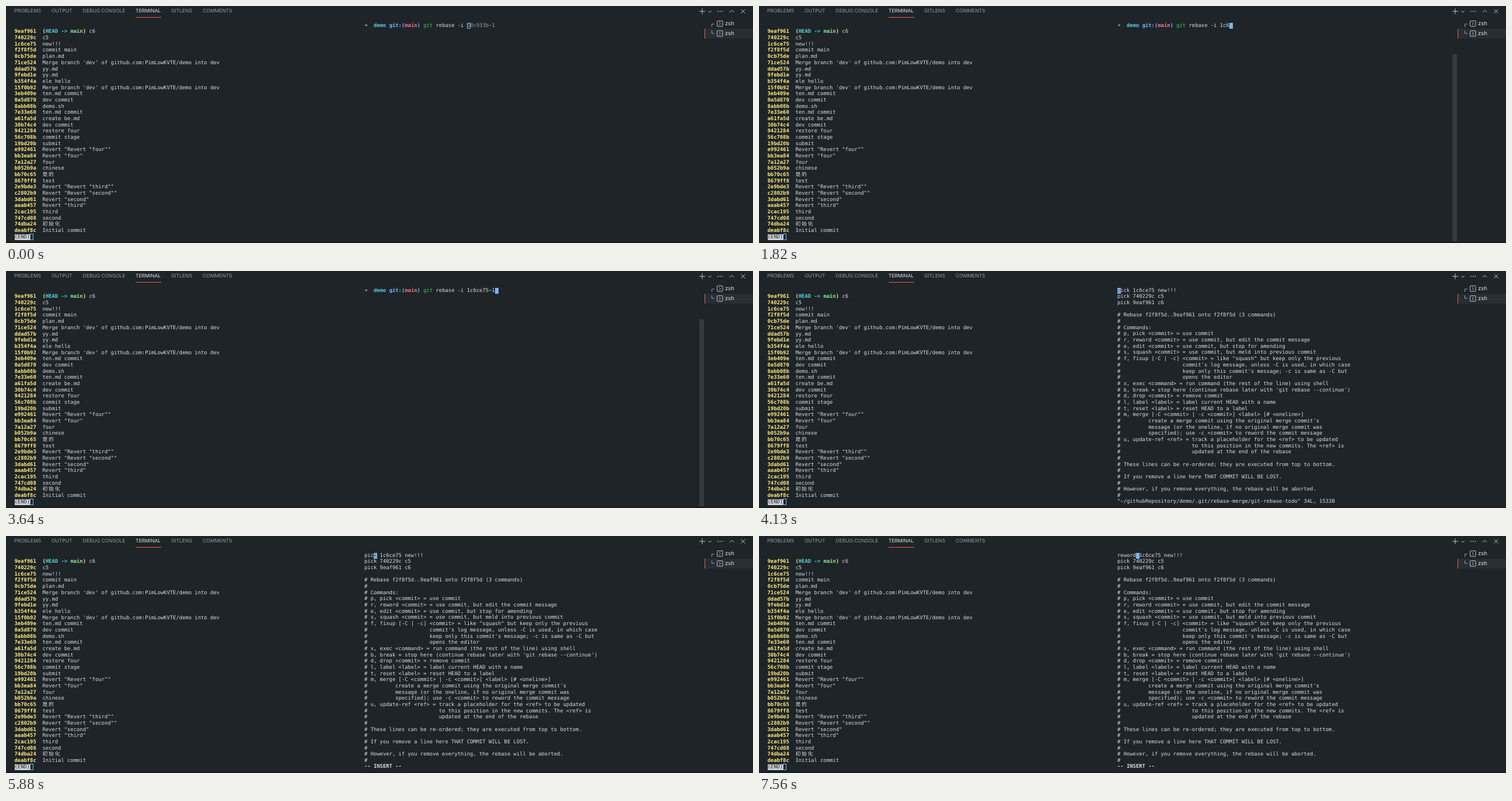
These frames come from a looping animation (1280x407 px, 8000 ms). An HTML page:

```html
<!DOCTYPE html>
<html lang="en">
<head>
<meta charset="utf-8">
<title>Interactive rebase</title>
<style>
  :root { --bg: #1f2428; --fg: #d9dde1; --cw: 5.3333px; --rh: 10.6667px; --blue: #79b8ff; --accent: #e5604c; }
  html, body { margin: 0; width: 100%; height: 100%; overflow: hidden; background: var(--bg); }
  #stage { position: relative; width: 1280px; height: 407px; overflow: hidden; background: var(--bg);
    color: var(--fg); text-rendering: geometricPrecision; }
  #stage > * { position: absolute; }
  pre, .cursor { margin: 0; font: 8.859px/var(--rh) "DejaVu Sans Mono", "Noto Sans CJK SC", monospace; white-space: pre; }
  .pane { top: 28.8px; left: 614px; }
  #log { left: 14.5px; }
  #picks { top: calc(28.8px + var(--rh)); }
  #help { top: calc(28.8px + 4 * var(--rh)); }
  .status { top: calc(28.8px + 34 * var(--rh)); }
  b { font-weight: 700; }
  .yellow { color: #ffea7f; }
  .cyan { color: #56d4dd; }
  .green { color: #85e89d; }
  .blue { color: var(--blue); }
  .red { color: #f97583; }
  .cmd { color: #34d058; }
  .hint { color: #959da5; }
  .arrow { display: inline-block; width: var(--cw); }
  .cjk { letter-spacing: 1.8px; }
  .inverse { background: #d1d5da; color: var(--bg); }
  .cursor { position: absolute; box-sizing: border-box; width: 5.6px; height: var(--rh); background: var(--blue); color: #586069; }
  .hollow { background: none; border: 1px solid var(--blue); }
  .tab, .name { font-family: Inter, "Liberation Sans", sans-serif; white-space: pre; }
  .tab { top: 4px; font-size: 8.5px; line-height: 11px; color: #959da5; }
  .tab.on { color: #e1e4e8; }
  #underline { left: 222px; top: 18.6px; width: 44px; height: 1px; background: var(--accent); }
  #selected { left: 1197px; top: 39px; width: 83px; height: 17px; background: #292e34; }
  #selected::before { content: ""; position: absolute; left: 0; width: 1px; height: 17px; background: var(--accent); }
  .name { left: 1232px; font-size: 9.5px; line-height: 12px; color: #e1e4e8; }
  #bar { left: 1188px; top: 83px; width: 8px; height: 321px; background: #353a3f; opacity: 0; }
  #foot { left: 0; top: 405px; width: 1280px; height: 2px; background: #191d21; }
  svg { left: 0; top: 0; fill: none; stroke: #d1d5da; stroke-width: .9; }
</style>
</head>
<body>
<div id="stage">
  <span class="tab" style="left:14px">PROBLEMS</span>
  <span class="tab" style="left:78px">OUTPUT</span>
  <span class="tab" style="left:131.5px">DEBUG CONSOLE</span>
  <span class="tab on" style="left:222px">TERMINAL</span>
  <span class="tab" style="left:283px">GITLENS</span>
  <span class="tab" style="left:337px">COMMENTS</span>
  <div id="underline"></div>
  <div id="selected"></div>
  <span class="name" style="top:24.5px">zsh</span>
  <span class="name" style="top:41.5px">zsh</span>
  <svg width="1280" height="407">
    <path d="M1188 9.2h10M1193 4.2v10M1203.5 8.3l2.6 2.6 2.6-2.6M1239.7 11l3.8-3.8 3.8 3.8M1259.5 5.7l7 7m0-7l-7 7"/>
    <path d="M1219 9.3h1.5m2.4 0h1.5m2.4 0h1.5" stroke-width="1.5"/>
    <path d="M1209.5 36v-5h4.5M1209.5 42v5h4.5" stroke="#a5abb1"/>
    <g id="icon"><rect x="1218.5" y="25.5" width="9.5" height="9.5" rx="1"/><path d="M1221.8 27.8l2.5 2.5-2.5 2.5"/></g>
    <use href="#icon" y="17"/>
  </svg>
  <pre id="log" class="pane"></pre>
  <pre id="shell" class="pane"><span id="line"></span><span id="cursor" class="cursor"></span></pre>
  <pre id="picks" class="pane">pick 740229c c5
pick 9eaf961 c6</pre>
  <pre id="help" class="pane">Rebase f2f8f5d..9eaf961 onto f2f8f5d (3 commands)

Commands:
p, pick &lt;commit&gt; = use commit
r, reword &lt;commit&gt; = use commit, but edit the commit message
e, edit &lt;commit&gt; = use commit, but stop for amending
s, squash &lt;commit&gt; = use commit, but meld into previous commit
f, fixup [-C | -c] &lt;commit&gt; = like "squash" but keep only the previous
                   commit's log message, unless -C is used, in which case
                   keep only this commit's message; -c is same as -C but
                   opens the editor
x, exec &lt;command&gt; = run command (the rest of the line) using shell
b, break = stop here (continue rebase later with 'git rebase --continue')
d, drop &lt;commit&gt; = remove commit
l, label &lt;label&gt; = label current HEAD with a name
t, reset &lt;label&gt; = reset HEAD to a label
m, merge [-C &lt;commit&gt; | -c &lt;commit&gt;] &lt;label&gt; [# &lt;oneline&gt;]
        create a merge commit using the original merge commit's
        message (or the oneline, if no original merge commit was
        specified); use -c &lt;commit&gt; to reword the commit message
u, update-ref &lt;ref&gt; = track a placeholder for the &lt;ref&gt; to be updated
                      to this position in the new commits. The &lt;ref&gt; is
                      updated at the end of the rebase

These lines can be re-ordered; they are executed from top to bottom.

If you remove a line here THAT COMMIT WILL BE LOST.

However, if you remove everything, the rebase will be aborted.
</pre>
  <pre id="info" class="pane status">"~/githubRepository/demo/.git/rebase-merge/git-rebase-todo" 34L, 1533B</pre>
  <pre id="mode" class="pane status"><b>-- INSERT --</b></pre>
  <div id="bar"></div>
  <div id="foot"></div>
</div>

<script>
const LOOP = 8000, OPEN = 4130, INSERT = 5110;
const CW = 16 / 3, RH = 32 / 3;
const $ = id => document.getElementById(id);

const commits = `9eaf961 c6
740229c c5
1c6ce75 new!!!
f2f8f5d commit main
0cb75de plan.md
71ce524 Merge branch 'dev' of github.com:PimLowKVTE/demo into dev
ddad57b yy.md
9febd1e yy.md
b354f4a ele hello
15f0b92 Merge branch 'dev' of github.com:PimLowKVTE/demo into dev
3eb409e ten.md commit
0a5d870 dev commit
8abb08b demo.sh
7e33e60 ten.md commit
a61fa5d create be.md
30b74c4 dev commit
9421284 restore four
56c708b commit stage
19bd20b submit
e992461 Revert "Revert "four""
bb3ea84 Revert "four"
7a12a27 four
b052b9a chinese
bb70c65 是的
8679ff8 test
2e9bde3 Revert "Revert "third""
c2802b9 Revert "Revert "second""
3dabd61 Revert "second"
aaab457 Revert "third"
2cac195 third
747cd08 second
74dba24 初始化
deabf8c Initial commit`.split("\n");

const prompt = '<b class="green arrow">➜</b>  <b class="cyan">demo</b> <b class="blue">git:(</b>' +
  '<b class="red">main</b><b class="blue">)</b> <span class="cmd">git</span> rebase -i ';
const promptCols = 33;
const hint = "58c933b~1";

// [start ms, typed argument]
const typing = [[0, ""], [770, "1"], [1120, "1c"], [1820, "1c6"], [2030, "1c6c"],
  [2310, "1c6ce75 "], [2800, "1c6ce75"], [3290, "1c6ce75~"], [3640, "1c6ce75~1"]];
// [start ms, rebase action, cursor column]
const editing = [[OPEN, "pick", 0], [5600, "pick", 1], [5740, "pick", 2], [5880, "pick", 3], [6020, "pick", 4],
  [6230, "pic", 3], [6370, "pi", 2], [6510, "p", 1], [6650, "", 0], [6720, "r", 1], [6790, "re", 2],
  [7000, "rew", 3], [7210, "rewo", 4], [7350, "rewor", 5], [7560, "reword", 6]];

function logRow(row, i) {
  const head = i ? "" : '<b class="yellow">(</b><b class="cyan">HEAD -&gt; </b><b class="green">main</b><b class="yellow">)</b> ';
  const message = row.slice(8).replace(/[一-龥]+/, '<span class="cjk">$&</span>');
  return `<b class="yellow">${row.slice(0, 7)}</b>  ${head}${message}`;
}
$("log").innerHTML = "\n" + commits.map(logRow).join("\n") + '\n<span class="inverse">(END)</span>' +
  `<span class="cursor hollow" style="left:${5 * CW}px;top:${34 * RH}px"></span>`;
$("help").textContent = $("help").textContent.split("\n").map(row => "# " + row).join("\n");

const stepAt = (steps, t) => steps.filter(step => step[0] <= t).pop();
const show = (id, on) => { $(id).style.visibility = on ? "visible" : "hidden"; };

function setCursor(col, char, hollow) {
  const cursor = $("cursor");
  cursor.style.left = col * CW + "px";
  cursor.style.top = 0;
  cursor.className = hollow ? "cursor hollow" : "cursor";
  cursor.textContent = hollow ? "" : char;
}

function drawShell(t) {
  const typed = stepAt(typing, t)[1];
  $("line").innerHTML = prompt + (typed || `<span class="hint">${hint}</span>`);
  setCursor(promptCols + typed.length, typed ? "" : hint[0], t < 70);
}

function drawEditor(t) {
  const [, action, col] = stepAt(editing, t);
  const line = action + " 1c6ce75 new!!!";
  $("line").textContent = line;
  setCursor(col, line[col], false);
}

let shown = "";
function draw(t) {
  const open = t >= OPEN;
  $("bar").style.opacity = open ? 0 : Math.min(4, Math.floor(t / 70)) / 4;
  const key = [open, t < 70, t < INSERT, stepAt(open ? editing : typing, t)].join();
  if (key === shown) return;
  shown = key;
  show("picks", open);
  show("help", open);
  show("info", open && t < INSERT);
  show("mode", t >= INSERT);
  (open ? drawEditor : drawShell)(t);
}

const start = performance.now();
function tick() {
  draw((performance.now() - start) % LOOP);
  requestAnimationFrame(tick);
}
tick();
</script>
</body>
</html>
```
